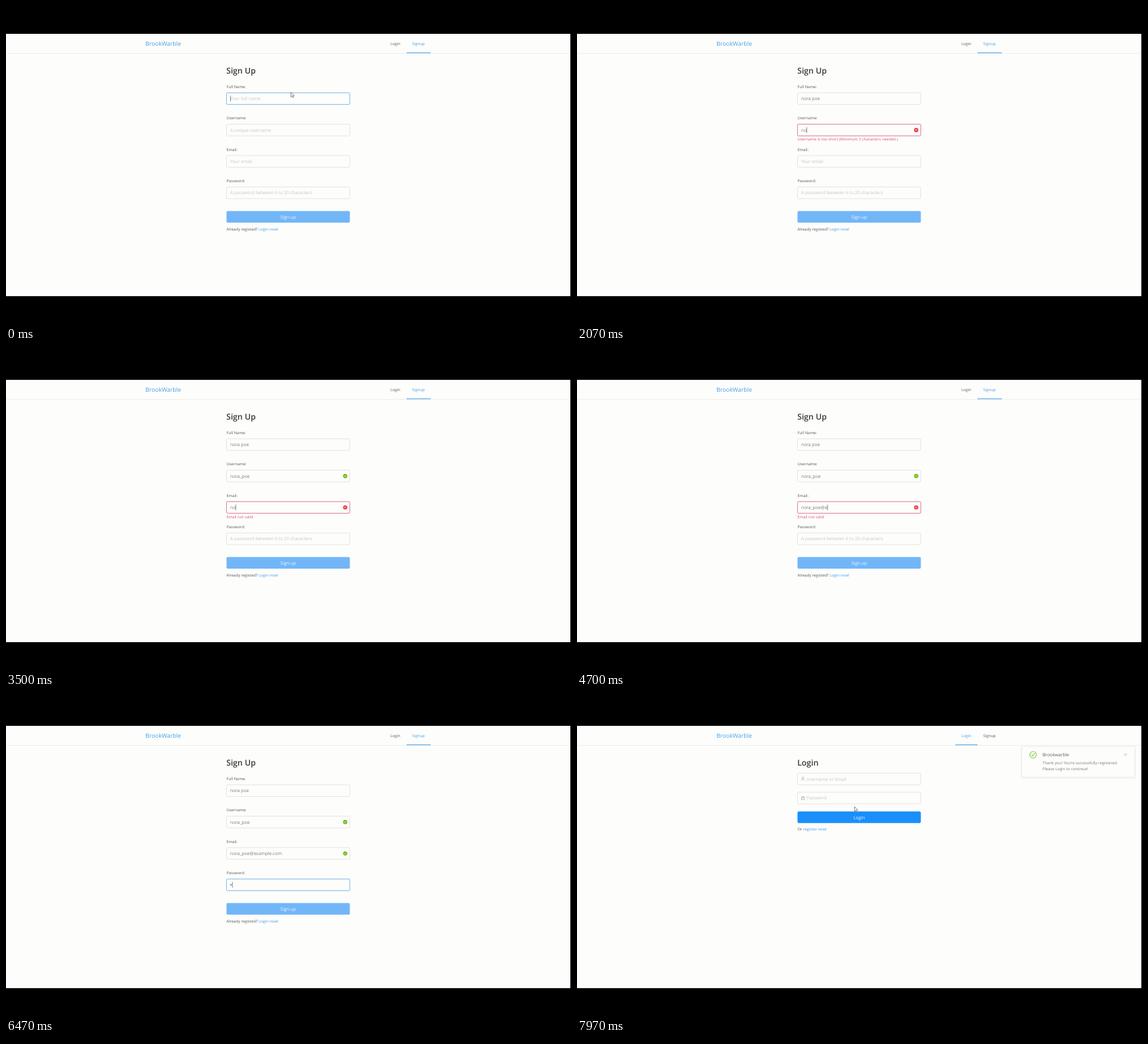
These frames come from a looping animation (852 px wide and 480 px high, 8 s). An HTML page:

```html
<!DOCTYPE html>
<html lang="en">
<head>
<meta charset="utf-8">
<title>Sign up form</title>
<style>
  html, body { margin: 0; width: 100%; height: 100%; overflow: hidden; background: #000; }
  svg { display: block; width: 100vw; height: 100vh; }
  text { font-family: "Open Sans", "Noto Sans", sans-serif; white-space: pre; text-rendering: geometricPrecision; }
</style>
</head>
<body>
<svg id="stage" viewBox="0 0 852 480"></svg>
<script>
const LOOP = 8000;
const SMALL = 5.9, MEDIUM = 6.75, LARGE = 12.2;
const C = {
  page: '#fdfdfc', line: '#dfdfdb', dark: '#383838', label: '#5c5c5c', value: '#7c7c7c',
  hint: '#c6c6c6', link: '#45a0e6', focus: '#6fb4ea', bad: '#e0688c', badText: '#e0586a',
  good: '#6cbd14', muted: '#72b6f8', blue: '#1a8ffa'
};
const LEFT = 332.5, WIDTH = 186, HEIGHT = 17.6;
const SUBMIT = 7500;

const stage = document.getElementById('stage');

function el(parent, tag, attrs, content) {
  const node = document.createElementNS('http://www.w3.org/2000/svg', tag);
  for (const k in attrs) node.setAttribute(k, attrs[k]);
  if (content !== undefined) node.textContent = content;
  parent.appendChild(node);
  return node;
}
const group = parent => el(parent, 'g', {});
const label = (parent, x, y, size, fill, str, more) =>
  el(parent, 'text', { x, y, 'font-size': size, fill, ...more }, str);
const box = (parent, y, stroke) =>
  el(parent, 'rect', { x: LEFT, y, width: WIDTH, height: HEIGHT, rx: 1.8, fill: 'none', stroke, 'stroke-width': 0.8 });
const alpha = (node, v) => node.setAttribute('opacity', v);
const show = (node, on) => node.setAttribute('display', on ? 'inline' : 'none');
const move = (node, x, y) => node.setAttribute('transform', `translate(${x} ${y})`);

const ramp = (t, start, span) => Math.min(1, Math.max(0, (t - start) / span));
const ease = p => p * p * (3 - 2 * p);
const during = (t, [from, to], span) => ramp(t, from, span) * (1 - ramp(t, to, span));
const mix = (a, b, p) => a + (b - a) * p;

function badge(parent, y, fill, mark) {
  const g = group(parent);
  move(g, 511.5, y);
  el(g, 'circle', { r: 3.2, fill });
  el(g, 'path', { d: mark, fill: 'none', stroke: '#fff', 'stroke-width': 0.8 });
  return g;
}

function button(parent, y, fill, str) {
  el(parent, 'rect', { x: LEFT, y, width: WIDTH, height: HEIGHT, rx: 1.8, fill });
  label(parent, 425.5, y + 11.4, MEDIUM, '#f0f7ff', str, { 'text-anchor': 'middle' });
}

function linkLine(parent, y, plain, link) {
  const line = label(parent, LEFT, y, SMALL, C.label, plain);
  el(line, 'tspan', { fill: C.link }, link);
}

// Page frame and navigation
el(stage, 'rect', { width: 852, height: 480, fill: '#000' });
el(stage, 'rect', { y: 42, width: 851, height: 396, fill: C.page });
el(stage, 'rect', { y: 71, width: 851, height: 0.8, fill: '#ededea' });
label(stage, 210.3, 60.3, 8.85, C.link, 'BrookWarble');
const navLogin = label(stage, 579.7, 58.8, SMALL, C.label, 'Login');
const navSignup = label(stage, 612.6, 58.8, SMALL, C.link, 'Signup');
const navBar = el(stage, 'rect', { y: 70.2, height: 1, fill: C.link });

// Sign up page
const signup = group(stage);
label(signup, 332.2, 102.3, LARGE, C.dark, 'Sign Up', { 'font-weight': 600 });

const fields = [
  { title: 'Full Name:', hint: 'Your full name', value: 'nora poe', y: 131,
    keys: [800, 970, 1030, 1130, 1230, 1330, 1430, 1530], focus: [-400, 1600],
    error: [970, 1150], note: 'Name is too short (Minimum 4 characters needed.)' },
  { title: 'Username:', hint: 'A unique username', value: 'nora_poe', y: 178.4, icon: true,
    keys: [1800, 1970, 2200, 2270, 2340, 2430, 2500, 2570], focus: [1600, 2700],
    error: [1830, 2200], ok: 2830, note: 'Username is too short (Minimum 3 characters needed.)' },
  { title: 'Email:', hint: 'Your email', value: 'nora_poe@example.com', y: 225.8, icon: true,
    keys: [3370, 3470, 3600, 3700, 3830, 3900, 4070, 4230, 4530, 4700,
           4900, 4970, 5070, 5230, 5330, 5470, 5670, 5740, 5800, 5870], focus: [2700, 5970],
    error: [3390, 5800], ok: 6080, note: 'Email not valid' },
  { title: 'Password:', hint: 'A password between 6 to 20 characters', y: 273.2, secret: true,
    keys: [6430, 6570, 6700, 6800, 6900, 7000], focus: [5970, LOOP],
    error: [6500, 6990], note: 'Password is too short (Minimum 6 characters needed.)' }
];

for (const f of fields) {
  const mid = f.y + HEIGHT / 2;
  label(signup, LEFT, f.y - 7, SMALL, C.label, f.title);
  box(signup, f.y, C.line);
  f.glow = box(signup, f.y, C.focus);
  f.red = box(signup, f.y, C.bad);
  f.hintNode = label(signup, 338, mid + 2.3, MEDIUM, C.hint, f.hint);
  f.text = label(signup, 338, mid + 2.3, MEDIUM, C.value, '');
  f.caret = el(signup, 'rect', { y: mid - 4.2, width: 0.7, height: 8.4, fill: C.label });
  f.noteNode = label(signup, LEFT, f.y + 25, SMALL, C.badText, f.note);
  if (f.secret) {
    f.dots = f.keys.map((_, i) =>
      el(signup, 'circle', { cx: 339.3 + 2.9 * i, cy: mid, r: 0.95, fill: C.label }));
  }
  if (f.icon) {
    f.cross = badge(signup, mid, '#e23a40', 'M-1.1-1.1L1.1 1.1M1.1-1.1L-1.1 1.1');
    f.tick = badge(signup, mid, C.good, 'M-1.5 0L-.4 1.1L1.5-1.1');
  }
}

button(signup, 309.4, C.muted, 'Sign up');
const ready = group(signup);
button(ready, 309.4, C.blue, 'Sign up');
linkLine(signup, 339, 'Already registed? ', 'Login now!');

// Login page
const login = group(stage);
label(login, 332.2, 102.3, LARGE, C.dark, 'Login', { 'font-weight': 600 });
for (const [y, hint] of [[113.4, 'Username or Email'], [142.2, 'Password']]) {
  box(login, y, C.line);
  label(login, 346, y + 11.1, MEDIUM, C.hint, hint);
}
const ICON = { fill: 'none', stroke: '#b0b0b0', 'stroke-width': 0.8 };
el(login, 'circle', { cx: 340.7, cy: 120.7, r: 1.3, ...ICON });
el(login, 'path', { d: 'M338.4 124.7C338.7 122 342.7 122 343 124.7', ...ICON });
el(login, 'rect', { x: 338.5, y: 150.4, width: 4.4, height: 3.2, ...ICON });
el(login, 'path', { d: 'M339.4 150.4V148.4H342V150.4', ...ICON });
button(login, 171.2, C.blue, 'Login');
linkLine(login, 200.3, 'Or ', 'register now!');

// Notification
const toast = group(stage);
const CHECK = { fill: 'none', stroke: '#86cc4a', 'stroke-width': 1.1 };
el(toast, 'rect', { x: 669, y: 73, width: 174, height: 49, rx: 3, fill: '#eeeeea', opacity: 0.55 });
el(toast, 'rect', { x: 670.6, y: 73, width: 170.6, height: 46.6, rx: 1.8, fill: C.page, stroke: '#e9e9e5', 'stroke-width': 0.8 });
el(toast, 'circle', { cx: 687.8, cy: 85.6, r: 4.9, ...CHECK });
el(toast, 'path', { d: 'M685.4 85.7L687.2 87.5L690.3 83.7', ...CHECK });
label(toast, 702, 88.1, MEDIUM, C.label, 'Brookwarble');
label(toast, 702, 99.8, SMALL, C.value, "Thank you! You're successfully registered.");
label(toast, 702, 109.2, SMALL, C.value, 'Please Login to continue!');
el(toast, 'path', { d: 'M825 83.4L829 87.4M829 83.4L825 87.4', stroke: '#b0b0b0', 'stroke-width': 0.7 });

const pointer = el(stage, 'path', {
  d: 'M0 0V7.2L1.7 5.7L2.9 8.4L4 7.9L2.8 5.3H5Z', fill: '#fff', stroke: '#5e5e5e', 'stroke-width': 0.7
});

function drawField(f, t) {
  const typed = f.keys.filter(k => k <= t).length;
  const wrong = during(t, f.error, 90);
  const active = t >= f.focus[0] && t < f.focus[1];
  alpha(f.glow, during(t, f.focus, 200) * (1 - wrong));
  alpha(f.red, wrong);
  alpha(f.noteNode, wrong);
  show(f.hintNode, !typed);
  let end;
  if (f.secret) {
    f.dots.forEach((d, i) => show(d, i < typed));
    end = 2.9 * typed;
  } else {
    f.text.textContent = f.value.slice(0, typed);
    end = typed ? f.text.getComputedTextLength() : 0;
  }
  const last = typed ? f.keys[typed - 1] : Math.max(0, f.focus[0]);
  f.caret.setAttribute('x', 338 + end);
  show(f.caret, active && (t - last) % 1060 < 530);
  if (f.icon) {
    alpha(f.cross, wrong);
    alpha(f.tick, ramp(t, f.ok, 150));
  }
}

function drawPointer(t) {
  const first = ease(ramp(t, 30, 600));
  const down = ease(ramp(t, 7130, 280));
  const up = ease(ramp(t, 7530, 370));
  const x = mix(mix(mix(429.7, 436, first), 428, down), 418.6, up);
  const y = mix(mix(mix(130, 131, first), 316, down), 164, up);
  move(pointer, x, y);
  show(pointer, t < 800 || t > 7150);
}

function draw(t) {
  const done = t >= SUBMIT;
  show(signup, !done);
  show(login, done);
  navLogin.setAttribute('fill', done ? C.link : C.label);
  navSignup.setAttribute('fill', done ? C.label : C.link);
  navBar.setAttribute('x', done ? 570.6 : 604);
  navBar.setAttribute('width', done ? 33.4 : 36.5);
  if (!done) fields.forEach(f => drawField(f, t));
  alpha(ready, ramp(t, 7000, 90));

  const slide = ramp(t, SUBMIT + 20, 260);
  show(toast, slide > 0);
  alpha(toast, slide);
  move(toast, 171 * (1 - slide) ** 2, 0);
  drawPointer(t);
}

function tick() {
  draw(performance.now() % LOOP);
  requestAnimationFrame(tick);
}
tick();
</script>
</body>
</html>
```
